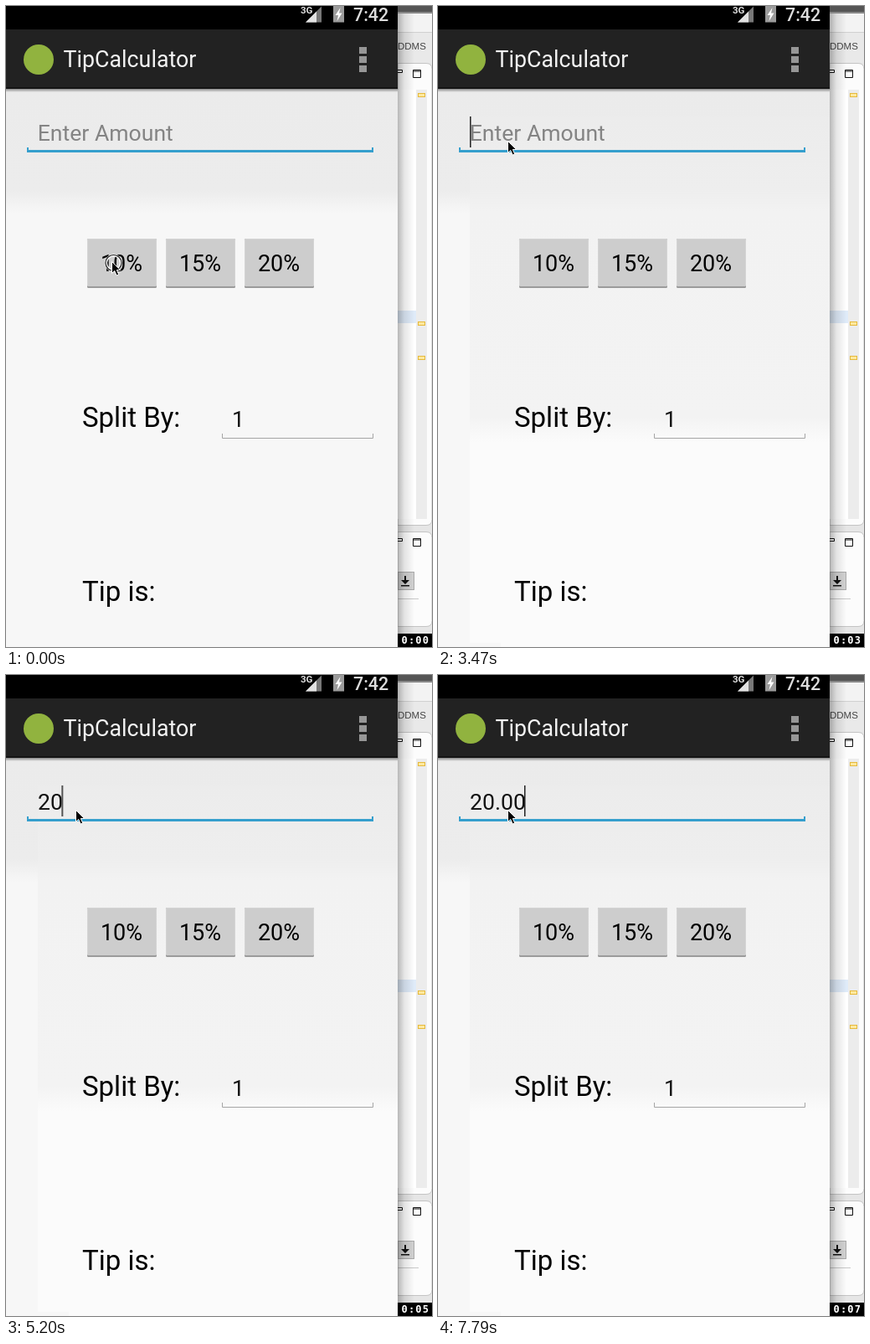
Recreate the animation shown at these times as an HTML page. Size 509 px wide and 766 px high, loop 8 s.

```html
<!DOCTYPE html>
<html lang="en">
<head>
<meta charset="utf-8">
<title>Tip calculator</title>
<style>
html, body { margin: 0; width: 100%; height: 100%; overflow: hidden; background: #fff; }
svg { display: block; width: 509px; height: 766px; }
text { font-family: Roboto, "Liberation Sans", sans-serif; white-space: pre; }
.field { font-size: 26.6px; }
.button { font-size: 27px; text-anchor: middle; }
.label { font-size: 33px; }
.timer text { font: bold 12px "DejaVu Sans Mono", monospace; letter-spacing: 1.2px; fill: #fff; }

/* every change is a hard step */
.anim { animation: 8s step-end infinite; }
#click { animation-name: click; }
#pointer { animation-name: pointer; }
#caret { animation-name: blink; }
#caretX { animation-name: advance; }
#hint { animation-name: hint; }
#seconds { animation-name: seconds; }
#shade { animation-name: shade; }
#shadeEnd { animation-name: shadeEnd; }
#k1 { animation-name: key1; }
#k2 { animation-name: key2; }
#k3 { animation-name: key3; }
#k4 { animation-name: key4; }
#k5 { animation-name: key5; }

@keyframes click { 0% { opacity: 1 } 1.875%, 100% { opacity: 0 } }
@keyframes pointer {
  0% { transform: translate(126px, 305px) }
  5.625% { transform: translate(123px, 285px) }
  7.5% { transform: translate(116px, 238px) }
  9.25% { transform: translate(109px, 197px) }
  10.625% { transform: translate(106px, 186px) }
  36.5% { transform: translate(103px, 182px) }
  38.375% { transform: translate(93px, 171px) }
  40.25%, 100% { transform: translate(83px, 161px) }
}
@keyframes blink {
  0%, 14.25%, 27.25%, 45.25%, 57.625%, 70.625%, 83.125% { opacity: 0 }
  9.25%, 19.875%, 32.875%, 50.75%, 61.25%, 76.25%, 88.625%, 100% { opacity: 1 }
}
@keyframes advance {
  0% { transform: translateX(0) }
  61.25% { transform: translateX(14px) }
  63.125% { transform: translateX(28.5px) }
  88.625% { transform: translateX(35.5px) }
  95.5% { transform: translateX(50px) }
  97.375%, 100% { transform: translateX(65px) }
}
@keyframes hint { 0% { opacity: 1 } 61.25%, 100% { opacity: 0 } }
@keyframes key1 { 0% { fill-opacity: 0 } 61.25%, 100% { fill-opacity: 1 } }
@keyframes key2 { 0% { fill-opacity: 0 } 63.125%, 100% { fill-opacity: 1 } }
@keyframes key3 { 0% { fill-opacity: 0 } 88.625%, 100% { fill-opacity: 1 } }
@keyframes key4 { 0% { fill-opacity: 0 } 95.5%, 100% { fill-opacity: 1 } }
@keyframes key5 { 0% { fill-opacity: 0 } 97.375%, 100% { fill-opacity: 1 } }
@keyframes seconds {
  0% { transform: translateY(0) }
  9.25% { transform: translateY(-20px) }
  25.375% { transform: translateY(-40px) }
  38.375% { transform: translateY(-60px) }
  48.875% { transform: translateY(-80px) }
  65% { transform: translateY(-100px) }
  78.125% { transform: translateY(-120px) }
  90.5%, 100% { transform: translateY(-140px) }
}
@keyframes shade { 0% { opacity: 0 } 9.25%, 100% { opacity: 1 } }
@keyframes shadeEnd { 0% { opacity: 0 } 38.375%, 100% { opacity: 1 } }
</style>
</head>
<body>
<svg viewBox="0 0 509 766" xmlns="http://www.w3.org/2000/svg">
  <defs>
    <linearGradient id="page" gradientUnits="userSpaceOnUse" x1="0" y1="100" x2="0" y2="766">
      <stop offset="0" stop-color="#ebebeb"/>
      <stop offset=".18" stop-color="#ececec"/>
      <stop offset=".222" stop-color="#f7f7f7"/>
    </linearGradient>
    <linearGradient id="bands" gradientUnits="userSpaceOnUse" x1="0" y1="132" x2="0" y2="761">
      <stop offset="0" stop-color="#ececec"/>
      <stop offset=".14" stop-color="#eeeeee"/>
      <stop offset=".18" stop-color="#f2f2f2"/>
      <stop offset=".57" stop-color="#f3f3f3"/>
      <stop offset=".62" stop-color="#fbfbfb"/>
    </linearGradient>
    <linearGradient id="barShadow" x2="0" y2="1">
      <stop stop-color="#888"/>
      <stop offset="1" stop-color="#888" stop-opacity="0"/>
    </linearGradient>
    <linearGradient id="edgeShadow">
      <stop stop-opacity=".28"/>
      <stop offset=".4" stop-opacity=".1"/>
      <stop offset="1" stop-opacity="0"/>
    </linearGradient>
    <clipPath id="timerBox"><rect x="468" y="750" width="41" height="16"/></clipPath>
    <g id="key">
      <rect width="83" height="59" rx="1.5" fill="#9b9b9b"/>
      <rect width="83" height="57" rx="1.5" fill="#d4d4d4"/>
      <rect x="1" y="1" width="81" height="56" fill="#cdcdcd"/>
    </g>
    <g id="maximise" fill="none" stroke="#111">
      <path d="M486.500 .5h9v9h-9zM486 2h10"/>
      <path d="M467 .5h6.500v3H467"/>
    </g>
    <rect id="marker" x="492.500" width="8" height="4" fill="#ffe9a0" stroke="#e5b93c"/>
  </defs>

  <!-- editor window behind the phone -->
  <rect x="468" width="41" height="766" fill="#e6e6e6"/>
  <rect x="468" width="41" height="9" fill="#555"/>
  <rect x="468" y="7" width="41" height="2" fill="#888"/>
  <rect x="468" y="9" width="41" height="22" fill="#f3f3f3"/>
  <path d="M468 31.500h41" stroke="#d0d0d0"/>
  <rect x="468" y="32" width="41" height="36" fill="#e9e9e9"/>
  <text x="468" y="52" font-size="11.500" fill="#444" style="font-family:'Liberation Sans',sans-serif">DDMS</text>
  <path d="M468 68.500h34q7 0 7 7v538q0 7-7 7h-34z" fill="#fcfcfc" stroke="#c4c4c4"/>
  <rect x="468" y="100" width="22" height="513" fill="#fff"/>
  <rect x="490" y="100" width="13" height="513" fill="#ececec"/>
  <rect x="468" y="364" width="22" height="15" fill="#dfebf9"/>
  <use href="#maximise" y="76"/>
  <use href="#marker" y="104.500"/>
  <use href="#marker" y="377.500"/>
  <use href="#marker" y="418.500"/>
  <path d="M468 628.500h34q7 0 7 7v99q0 7-7 7h-34z" fill="#fcfcfc" stroke="#c4c4c4"/>
  <use href="#maximise" y="636"/>
  <rect x="468.500" y="676.500" width="19" height="21" fill="#d2d2d2" stroke="#aaa"/>
  <path d="M476 681h2v5h4l-5 5-5-5h4zM472 692h10v1.500h-10z" fill="#111"/>
  <path d="M468 708.500h25" stroke="#c8c8c8"/>
  <rect x="468" y="9" width="20" height="741" fill="url(#edgeShadow)"/>

  <!-- phone -->
  <rect y="99" width="468" height="667" fill="url(#page)"/>
  <rect id="shade" class="anim" x="38" y="132" width="430" height="629" fill="url(#bands)"/>
  <rect id="shadeEnd" class="anim" x="75" y="761" width="393" height="5" fill="#fbfbfb"/>
  <rect y="99" width="468" height="4" fill="url(#barShadow)"/>
  <rect width="468" height="28" fill="#000"/>
  <rect y="28" width="468" height="70" fill="#222"/>
  <rect y="97" width="468" height="2" fill="#151515"/>

  <text x="352" y="9" font-size="11.500" font-weight="700" fill="#ddd">3G</text>
  <path d="M358 19.500L377 .5v19z" fill="#777"/>
  <path d="M358 19.500L371 6.500v13z" fill="#e2e2e2"/>
  <path d="M391 0h13v19.500h-13z" fill="#9b9b9b"/>
  <path d="M399.500 2l-6 9h3.500l-1.500 7 6-9.500h-3.500z" fill="#fff"/>
  <text x="415" y="18" font-size="21.400" font-weight="500" fill="#ddd">7:42</text>

  <circle cx="39" cy="64" r="18" fill="#91b33f"/>
  <text x="68.500" y="73" font-size="26.800" fill="#f3f3f3">TipCalculator</text>
  <path d="M422 49h9v8h-9zm0 11h9v8h-9zm0 11h9v8h-9z" fill="#979797"/>

  <path d="M25 169h2v3h410v-3h2v6H25z" fill="#359fcd"/>
  <text id="hint" class="field anim" x="37.700" y="161" fill="#848484">Enter Amount</text>
  <text class="field" x="38" y="161" fill="#111"><tspan id="k1" class="anim">2</tspan><tspan id="k2" class="anim">0</tspan><tspan id="k3" class="anim">.</tspan><tspan id="k4" class="anim">0</tspan><tspan id="k5" class="anim">0</tspan></text>
  <g id="caretX" class="anim"><rect id="caret" class="anim" x="38" y="132" width="1.500" height="37" fill="#222"/></g>

  <use href="#key" x="97" y="278"/>
  <use href="#key" x="191" y="278"/>
  <use href="#key" x="285" y="278"/>
  <text class="button" x="138" y="317">10%</text>
  <text class="button" x="232" y="317">15%</text>
  <text class="button" x="326" y="317">20%</text>

  <text class="label" x="91" y="503">Split By:</text>
  <text class="field" x="270" y="503" fill="#111">1</text>
  <path d="M258.500 511v5.500h180V511" fill="none" stroke="#a5a5a5"/>
  <text class="label" x="91" y="711">Tip is:</text>

  <!-- elapsed time -->
  <g class="timer" clip-path="url(#timerBox)">
    <rect x="468" y="750" width="41" height="16"/>
    <text x="472.500" y="762">0:0</text>
    <g id="seconds" class="anim">
      <text x="497.700" y="762">0</text>
      <text x="497.700" y="782">1</text>
      <text x="497.700" y="802">2</text>
      <text x="497.700" y="822">3</text>
      <text x="497.700" y="842">4</text>
      <text x="497.700" y="862">5</text>
      <text x="497.700" y="882">6</text>
      <text x="497.700" y="902">7</text>
    </g>
  </g>

  <!-- mouse -->
  <g id="click" class="anim" fill="none">
    <circle cx="128.500" cy="307" r="9" stroke="#fff" stroke-width="3"/>
    <circle cx="128.500" cy="307" r="9.500" stroke="#222" stroke-width="1.200"/>
  </g>
  <path id="pointer" class="anim" d="M.5 .5v14l3.200-3 2.400 5.500 2.600-1.100-2.300-5.400h4.300z" fill="#000" stroke="#fff"/>
</svg>
</body>
</html>
```
